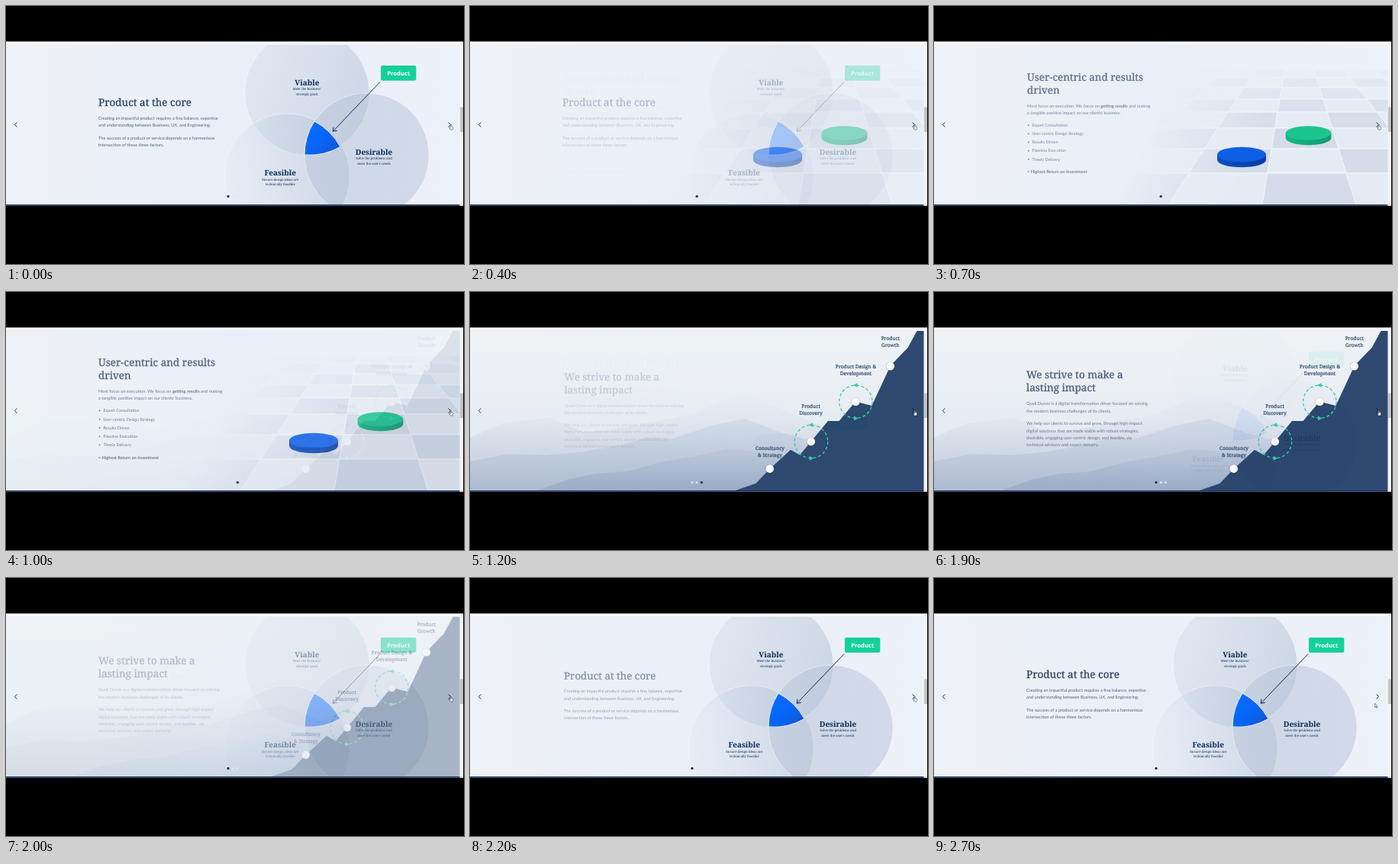
An HTML page for the animation above (2800 ms loop, 600 px wide and 338 px high).

```html
<!DOCTYPE html>
<html lang="en">
<head>
<meta charset="utf-8">
<title>Slider</title>
<style>
  html, body { margin: 0; width: 100%; height: 100%; overflow: hidden; background: #000; }
  svg { position: absolute; left: 0; top: 0; width: 600px; height: 338px; text-rendering: geometricPrecision; }
  .page { z-index: 0; }
  .ui { z-index: 5; }
  .slide { clip-path: inset(51px 5.5px 77.5px 0); animation: fade 2.8s step-end infinite; }
  .out { animation: leave 2.8s step-end infinite; }
  .copy { transform-origin: 280px 150px; animation: enter 2.8s step-end infinite; font: 5.68px Lato, sans-serif; fill: #4d5f7c; }
  .one, .one .copy, .three .out { animation-delay: -.9s; }
  .two, .two .copy, .one .out { animation-delay: -2.5s; }
  .three, .three .copy, .two .out { animation-delay: -1.8s; }
  .head { font: 500 13.5px "Noto Serif", serif; fill: #2a4062; stroke: #2a4062; stroke-width: .25; }
  .serif { font-family: "Noto Serif", serif; fill: #0b2b57; text-anchor: middle; }
  .name { font-size: 10px; font-weight: 700; }
  .note { font-size: 4.25px; }
  .step { font-size: 6.5px; font-weight: 500; stroke: #0b2b57; stroke-width: .2; }
  .list { font-size: 5.4px; }
  .bold { font-weight: 700; }
  .active { animation: dot 2.8s step-end infinite; }
  .hand { animation: hand 2.8s step-end infinite; }
  .pointer { animation: pointer 2.8s step-end infinite; }

  @keyframes fade {
    0% { opacity: .08; z-index: 3; }
    3.57% { opacity: .45; z-index: 3; }
    7.14% { opacity: .85; z-index: 3; }
    10.71% { opacity: 1; z-index: 3; }
    23.2% { opacity: 1; z-index: 2; }
    53.57%, 100% { opacity: 0; z-index: 1; }
  }
  @keyframes leave {
    0% { opacity: .92; }
    3.57% { opacity: .55; }
    7.14% { opacity: .15; }
    10.71% { opacity: 0; }
    55%, 100% { opacity: 1; }
  }
  @keyframes enter {
    0% { opacity: 0; transform: translateY(2.4px) scale(.982); }
    3.57% { opacity: .05; transform: translateY(2.3px) scale(.983); }
    7.14% { opacity: .25; transform: translateY(2.2px) scale(.984); }
    10.71% { opacity: .55; transform: translateY(1.7px) scale(.987); }
    14.28% { opacity: .75; transform: translateY(.8px) scale(.993); }
    17.85% { opacity: .87; transform: translateY(.4px) scale(.996); }
    21.42% { opacity: .93; transform: translateY(.2px) scale(.998); }
    24.99% { opacity: .97; transform: none; }
    28.56%, 100% { opacity: 1; transform: none; }
  }
  @keyframes dot {
    0%, 67.85%, 100% { transform: none; }
    10.71% { transform: translateX(6.2px); }
    35.71% { transform: translateX(12.4px); }
  }
  @keyframes hand { 0% { opacity: 1; } 92.85%, 100% { opacity: 0; } }
  @keyframes pointer { 0% { opacity: 0; } 92.85%, 100% { opacity: 1; } }
</style>
</head>
<body>

<svg class="page" viewBox="0 0 600 338">
  <rect y="46.5" width="599" height="215" fill="#fdfcfd"/>
  <rect y="49.5" width="594.5" height="1.5" fill="#eceff4"/>
  <rect y="51" width="594.5" height="209.5" fill="#edf1f7"/>
</svg>

<svg class="slide one" viewBox="0 0 600 338">
  <defs>
    <linearGradient id="sky">
      <stop offset="0" stop-color="#eef2f6"/><stop offset=".5" stop-color="#e9eff8"/><stop offset="1" stop-color="#edf1f8"/>
    </linearGradient>
    <linearGradient id="viable" x1="0" y1=".3" x2="1" y2=".6">
      <stop offset="0" stop-color="#c3cddd" stop-opacity=".25"/><stop offset="1" stop-color="#b4c1d6" stop-opacity=".55"/>
    </linearGradient>
    <linearGradient id="feasible" x1="0" y1=".6" x2="1" y2=".45">
      <stop offset="0" stop-color="#c3cddd" stop-opacity=".05"/><stop offset="1" stop-color="#b4c1d6" stop-opacity=".6"/>
    </linearGradient>
    <linearGradient id="core" x1="0" y1="0" x2="1" y2="1">
      <stop offset="0" stop-color="#0a6dff"/><stop offset=".5" stop-color="#0866fa"/><stop offset="1" stop-color="#1553c4"/>
    </linearGradient>
  </defs>
  <g class="out">
    <rect width="600" height="338" fill="url(#sky)"/>
    <g stroke="#f6f9fd" stroke-opacity=".8" stroke-width=".7">
      <circle cx="394.5" cy="113.5" r="81.5" fill="url(#viable)"/>
      <circle cx="368" cy="223" r="82" fill="url(#feasible)"/>
      <circle cx="472.5" cy="195.5" r="81.5" fill="#b7c4d9" fill-opacity=".5"/>
    </g>
    <path d="M404 151A82 82 0 0 1 438 184.5A81.5 81.5 0 0 1 391 195A81.5 81.5 0 0 1 404 151Z" fill="url(#core)" stroke="#f6f9fd" stroke-width=".9"/>
    <path d="M490 99.5L428.5 164M429 158.8L428.2 164.3L433.8 163.2" fill="none" stroke="#14305c" stroke-width="1"/>
    <rect x="491" y="78" width="46.3" height="19.7" rx="2" fill="#14d199"/>
    <text x="514.2" y="91" text-anchor="middle" font-family="Open Sans, sans-serif" font-weight="700" font-size="7.7" fill="#fff">Product</text>
    <g class="serif">
      <g class="name">
        <text x="394.3" y="103.8">Viable</text>
        <text x="482" y="194.8">Desirable</text>
        <text x="359.2" y="222.3">Feasible</text>
      </g>
      <g class="note">
        <text x="394.3" y="110.3">Meet the business'</text><text x="394.3" y="116.7">strategic goals</text>
        <text x="482" y="201.2">Solve the problems and</text><text x="482" y="207.6">meet the user's needs</text>
        <text x="359.2" y="229">Ensure design ideas are</text><text x="359.2" y="235.4">technically feasible</text>
      </g>
    </g>
    <g class="copy">
      <text class="head" x="121" y="130.7">Product at the core</text>
      <text x="121" y="148.7">Creating an impactful product requires a fine balance, expertise</text>
      <text x="121" y="158.1">and understanding between Business, UX, and Engineering.</text>
      <text x="121" y="174.8">The success of a product or service depends on a harmonious</text>
      <text x="121" y="184.2">intersection of these three factors.</text>
    </g>
  </g>
</svg>

<svg class="slide two" viewBox="0 0 600 338">
  <defs>
    <linearGradient id="haze" gradientUnits="userSpaceOnUse" x1="310" y1="115" x2="425" y2="175">
      <stop offset="0" stop-color="#000"/><stop offset="1" stop-color="#fff"/>
    </linearGradient>
    <mask id="veil"><rect width="600" height="338" fill="url(#haze)"/></mask>
    <linearGradient id="blue"><stop offset="0" stop-color="#0c4fc8"/><stop offset="1" stop-color="#083c9c"/></linearGradient>
    <linearGradient id="green"><stop offset="0" stop-color="#16b885"/><stop offset="1" stop-color="#0f9b70"/></linearGradient>
  </defs>
  <g class="out">
    <rect width="600" height="338" fill="url(#sky)"/>
    <g id="board" mask="url(#veil)" stroke="#f3f6fb" stroke-width=".9"></g>
    <path d="M371 194.5v7a32 9.8 0 0 0 64 0v-7z" fill="url(#blue)"/>
    <ellipse cx="403" cy="194.5" rx="32" ry="9.8" fill="#0f5fe6"/>
    <path d="M460.7 166.5v6.5a29.8 9.3 0 0 0 59.6 0v-6.5z" fill="url(#green)"/>
    <ellipse cx="490.5" cy="166.5" rx="29.8" ry="9.3" fill="#1cc48e"/>
    <g class="copy">
      <text class="head" x="121" y="97">User-centric and results</text>
      <text class="head" x="121" y="114">driven</text>
      <text x="121" y="131.8">Most focus on execution. We focus on <tspan class="bold">getting results</tspan> and making</text>
      <text x="121" y="141.3">a tangible positive impact on our clients' business.</text>
      <g class="list" id="list"></g>
      <text class="bold" x="121" y="218.7" font-size="5.6">= Highest Return on Investment</text>
    </g>
  </g>
</svg>

<svg class="slide three" viewBox="0 0 600 338">
  <defs>
    <linearGradient id="air" x2="0" y2="1">
      <stop offset="0" stop-color="#eff3f6"/><stop offset=".5" stop-color="#e8edf3"/><stop offset="1" stop-color="#dbe2ec"/>
    </linearGradient>
    <linearGradient id="far" gradientUnits="userSpaceOnUse" x1="0" y1="130" x2="0" y2="261">
      <stop offset="0" stop-color="#e8edf3"/><stop offset=".3" stop-color="#dfe5ee"/><stop offset="1" stop-color="#b3bfd2"/>
    </linearGradient>
    <linearGradient id="mid" gradientUnits="userSpaceOnUse" x1="0" y1="165" x2="0" y2="261">
      <stop offset="0" stop-color="#d2dae6"/><stop offset="1" stop-color="#a2b1c9"/>
    </linearGradient>
    <linearGradient id="near" gradientUnits="userSpaceOnUse" x1="0" y1="203" x2="0" y2="261">
      <stop offset="0" stop-color="#b7c3d6"/><stop offset="1" stop-color="#8c9fbe"/>
    </linearGradient>
    <g id="cycle">
      <circle r="21.7" fill="none" stroke="#1fc598" stroke-width="1.3" stroke-dasharray="4 2.82"/>
      <path d="M-3 -21.7l5.2 -3v6zM3 21.7l-5.2 -3v6z" fill="#1fc598"/>
    </g>
    <g id="node">
      <circle cy=".4" r="6.2" fill="#051633" opacity=".2"/>
      <circle r="5.3" fill="#fff"/>
    </g>
  </defs>
  <g class="out">
    <rect y="51" width="600" height="210" fill="url(#air)"/>
    <path d="M0 191L42 172L66 169L104 165L150 184L200 178L240 170L290 160L330 144L360 134L400 150L470 180V261H0Z" fill="url(#far)"/>
    <path d="M0 222L50 212L100 214L150 209L200 200L235 190L265 192L320 174L360 166L410 185L450 195V261H0Z" fill="url(#mid)"/>
    <path d="M85 261L130 245L165 238L205 235L250 223L300 214L340 205L410 215V261Z" fill="url(#near)"/>
    <path d="M345 261L374.5 250.7L393 231.5L420 206.8L432 213.5L447 195.5L469 169H483.5L505 143.5L526.3 149L551 96.3L573.5 73L585.5 51H600V261Z" fill="#0b2b57"/>
    <use href="#cycle" x="447" y="196"/>
    <use href="#cycle" x="505.3" y="143.7"/>
    <use href="#node" x="392.7" y="231.6"/>
    <use href="#node" x="446.8" y="196"/>
    <use href="#node" x="505.3" y="143.8"/>
    <use href="#node" x="550.8" y="97.2"/>
    <g class="serif step">
      <text x="550.8" y="63.3">Product</text><text x="550.8" y="72.3">Growth</text>
      <text x="505.5" y="100">Product Design &amp;</text><text x="505.5" y="109">Development</text>
      <text x="446.5" y="152">Product</text><text x="446.5" y="161">Discovery</text>
      <text x="393" y="207.3">Consultancy</text><text x="393" y="216.3">&amp; Strategy</text>
    </g>
    <g class="copy">
      <text class="head" x="121" y="113.3">We strive to make a</text>
      <text class="head" x="121" y="130.3">lasting impact</text>
      <text x="121" y="148.4">Quell Dunes is a digital transformation driver focused on solving</text>
      <text x="121" y="157.8">the modern business challenges of its clients.</text>
      <text x="121" y="174.4">We help our clients to survive and grow, through high-impact</text>
      <text x="121" y="183.7">digital solutions that are made viable with robust strategies,</text>
      <text x="121" y="193">desirable, engaging user-centric design, and feasible, via</text>
      <text x="121" y="202.3">technical advisory and expert delivery.</text>
    </g>
  </g>
</svg>

<svg class="ui" viewBox="0 0 600 338">
  <rect y="260" width="594.5" height="1.5" fill="#16305c"/>
  <rect x="594.5" y="47" width="4.5" height="214.5" fill="#f4f4f5"/>
  <rect x="595" y="132.5" width="4" height="32.5" fill="#c2c2c4"/>
  <g fill="none" stroke="#121a2b" stroke-width=".95">
    <path d="M14.4 152.4L11.3 155.5L14.4 158.6"/>
    <path d="M579.5 152.4L582.6 155.5L579.5 158.6"/>
  </g>
  <g fill="#dfe7f1"><circle cx="291" cy="249.4" r="1.5"/><circle cx="297.2" cy="249.4" r="1.5"/><circle cx="303.4" cy="249.4" r="1.5"/></g>
  <circle class="active" cx="291" cy="249.4" r="1.6" fill="#0b2b57"/>
  <path class="hand" d="M582.2 155.2q.7 -.6 1 .2v2.1l2 .6q.6 .3 .4 1.3l-.6 2.6h-2.7l-1.6 -2.4q.2 -.7 1.5 .2z" fill="#fff" stroke="#222" stroke-width=".5"/>
  <path class="pointer" d="M577.7 164.3v5.2l1.2 -1.1l.9 1.9l.8 -.4l-.9 -1.8h1.6z" fill="#fff" stroke="#222" stroke-width=".5"/>
</svg>

<script>
  const NS = "http://www.w3.org/2000/svg";
  const add = (parent, tag, attrs, text = "") => {
    const el = document.createElementNS(NS, tag);
    for (const key in attrs) el.setAttribute(key, attrs[key]);
    el.textContent = text;
    parent.append(el);
  };

  // Checkerboard floor seen in perspective
  const rows = [83, 94, 107, 122, 139, 160, 187, 219, 262];
  const edge = (col, y) => (473 + (col + .65) * (y - 3) * .478).toFixed(1);
  for (let r = 0; r < rows.length - 1; r++) {
    const top = rows[r], low = rows[r + 1];
    for (let c = -5; c < 5; c++) {
      add(board, "path", {
        d: `M${edge(c, top)} ${top}H${edge(c + 1, top)}L${edge(c + 1, low)} ${low}H${edge(c, low)}Z`,
        fill: (r + c) % 2 ? "#e5ebf4" : "#d4dce9",
        opacity: Math.min(1, .2 + r * .17)
      });
    }
  }

  const items = ["Expert Consultation", "User-centric Design Strategy", "Results Driven", "Flawless Execution", "Timely Delivery"];
  items.forEach((item, i) => {
    const y = 157.3 + i * 11.2;
    add(list, "circle", { cx: 122.6, cy: y - 1.8, r: .9 });
    add(list, "text", { x: 127.4, y }, item);
  });
</script>
</body>
</html>
```
